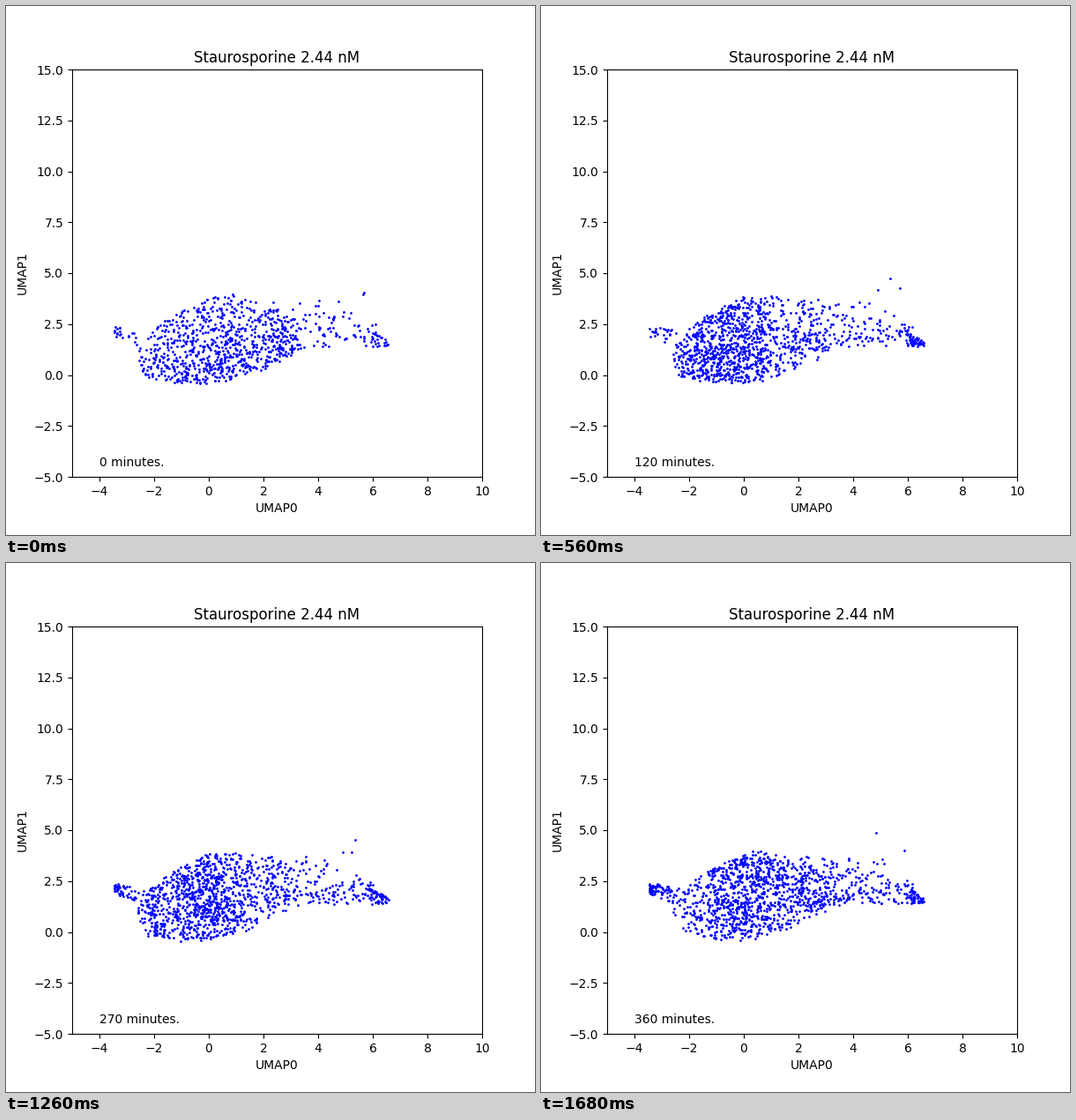
Animation, 600 px wide and 600 px high, one loop 1820 ms. Source, as a matplotlib script:

```python
import numpy as np
import matplotlib.pyplot as plt
from matplotlib.animation import FuncAnimation

STEPS = 13
STEP_MS = 140


def body(rng, n, step, late):
    """Main oval, whose densest part swings left and back."""
    center = 0.15 - 0.75 * np.sin(np.pi * late)
    width = 1.5 + 0.4 * np.exp(-step)
    x = rng.normal(center, width, 2 * n)
    low = -0.4 + 0.1 * (x + 0.7) ** 2
    high = 4.0 - 0.17 * (x - 0.5) ** 2
    y = low + (high - low) * rng.beta(0.95 + 0.35 * late, 1.3, 2 * n)
    y += rng.normal(0, 0.05, 2 * n)
    keep = (x > -2.6 + 0.3 * (y - 0.9) ** 2) & (x < 3.4)
    return x[keep][:n], y[keep][:n]


def left_tip(rng, n):
    """Wedge that narrows toward the far left."""
    u = rng.beta(0.8, 1.3, n)
    spread = rng.uniform(-1, 1, n) * (0.25 + 0.2 * u)
    return -3.47 + 1.1 * u, 2.15 - 0.4 * u + spread


def band(rng, n):
    """Low strip that joins the body to the right tip."""
    x = rng.uniform(2, 6.2, n)
    low = 1.35 - 0.12 * np.clip(4 - x, 0, 2)
    return x, low + 1.2 * rng.beta(1.4, 1.6, n)


def fan(rng, n):
    """Thin scatter above the strip."""
    x = 2 + 3.6 * rng.beta(1.1, 1.5, n)
    return x, rng.uniform(2.4, 3.75 - 0.08 * (x - 3) ** 2)


def right_tip(rng, n):
    """Slanted cluster at the far right."""
    u = rng.random(n)
    y = 1.4 + (0.95 - 0.75 * u) * rng.random(n)
    return 5.9 + 0.7 * u, y


def strays(rng, n):
    return rng.uniform(4.6, 5.9, n), rng.uniform(3.5, 5.1, n)


def cloud(step):
    rng = np.random.default_rng(100 + step)
    late = step / (STEPS - 1)
    grown = 1 - np.exp(-step)
    parts = [
        body(rng, int(780 + 220 * grown), step, late),
        left_tip(rng, int(20 + 50 * late ** 2)),
        band(rng, int(75 + 75 * late)),
        fan(rng, int(35 + 40 * late)),
        right_tip(rng, int(22 + 25 * grown)),
        strays(rng, 3),
    ]
    return np.hstack(parts)


fig, ax = plt.subplots(figsize=(6, 6), dpi=100)
ax.set(xlim=(-5, 10), ylim=(-5, 15), xlabel="UMAP0", ylabel="UMAP1",
       title="Staurosporine 2.44 nM")
cells, = ax.plot([], [], "o", color="blue", markersize=1)
clock = ax.text(-4, -4.5, "")


def update(step):
    cells.set_data(*cloud(step))
    clock.set_text(f"{30 * step} minutes.")
    return cells, clock


anim = FuncAnimation(fig, update, frames=STEPS, interval=STEP_MS,
                     repeat=True, repeat_delay=0)
plt.show()
```
